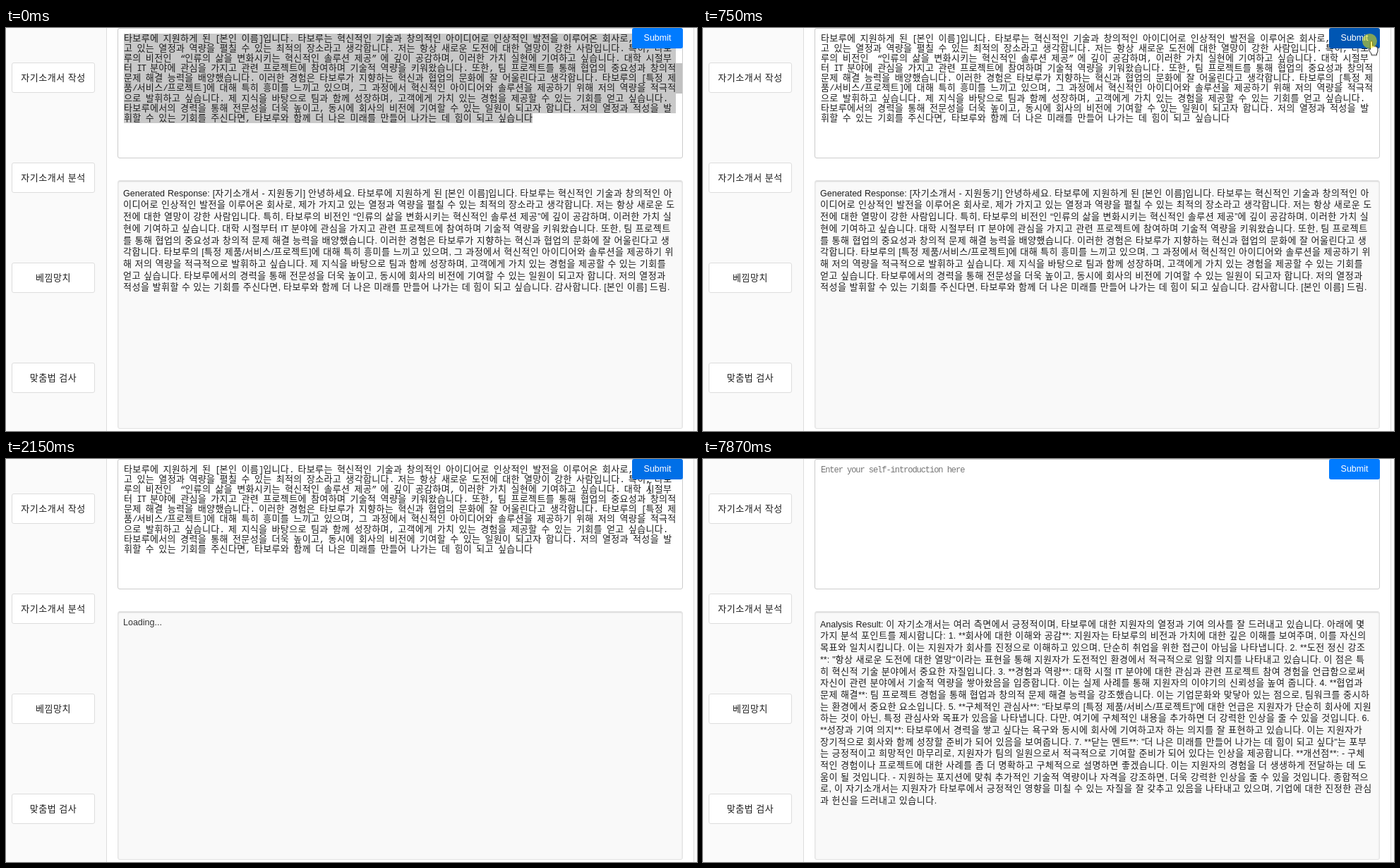
Recreate the animation shown at these times as an HTML page. Size 979 px wide and 572 px high, loop 9.4 s.

```html
<!DOCTYPE html>
<html lang="ko">
<head>
<meta charset="utf-8">
<title>자기소개서 분석</title>
<style>
html, body { margin: 0; width: 100%; height: 100%; overflow: hidden; }
body { position: relative; background: #fafafa; color: #1c1c1c;
  font: 12.5px/16.68px "Liberation Sans", Arial, sans-serif; }
body * { box-sizing: border-box; }
body > *, .cursor path { position: absolute; }
b { font: 13px/0 "Noto Sans CJK KR", "Noto Sans CJK", sans-serif; letter-spacing: .54px; }

.main { left: 142px; top: -5px; width: 833px; height: 590px; background: #fff;
  border: 1px solid #ddd; }
.tab { left: 8px; width: 118px; height: 43px; line-height: 42px; text-align: center;
  background: #fff; border: 1px solid #ddd; border-radius: 3px; word-spacing: .45px; }
.field { left: 158px; top: 0; width: 801px; height: 185px; background: #fff;
  border: 1px solid #ccc; border-radius: 3px; }
.panel { left: 158px; top: 216px; width: 801px; height: 353px; background: #f9f9f9;
  border: 1px solid #e4e4e4; border-radius: 3px;
  box-shadow: inset 0 1px 2px rgba(0,0,0,.16); }

pre { margin: 0; white-space: pre; }
.out { left: 166px; top: 226.8px; font: inherit; word-spacing: .46px; }
.in { left: 167px; top: 9px; font: 12px/14.1px "Liberation Mono", monospace; letter-spacing: -1.04px; }
.in b { letter-spacing: .36px; }
.hint { color: #757575; }
.wait { top: 224.3px; color: #333; }
.sel { left: 167px; top: 8px; width: 782px; height: 113px; background: #c8c8c8; }
.sel.last { top: 121px; width: 579px; height: 14px; }
.thumb { left: 949px; top: 50px; width: 9px; height: 43px; background: #c1c1c1; }

.submit { left: 887px; top: 0; width: 72px; height: 29px; border-radius: 3px; color: #fff;
  line-height: 29px; text-align: center; animation: hover 9.4s ease infinite; }
.ring { left: 934px; top: 8px; width: 21px; height: 21px; border-radius: 50%;
  background: rgba(255,240,0,.5); animation: ring 9.4s step-end infinite; }
.cursor { left: 0; top: 0; width: 1px; height: 1px; overflow: visible;
  animation: move 9.4s linear infinite; }
.arrow { animation: arrow 9.4s step-end infinite; }
.hand { animation: hand 9.4s step-end infinite; }
.beam { animation: beam 9.4s step-end infinite; }

.sel, .thumb { animation: selected 9.4s step-end infinite; }
.first { animation: first 9.4s step-end infinite; }
.wait { animation: wait 9.4s step-end infinite; }
.typed { animation: typed 9.4s step-end infinite; }
.done { animation: done 9.4s step-end infinite; }

@keyframes selected { 0% { visibility: visible } 7.979%, 100% { visibility: hidden } }
@keyframes first { 0% { visibility: visible } 8.723%, 100% { visibility: hidden } }
@keyframes wait { 0% { visibility: hidden } 8.723% { visibility: visible } 83.723%, 100% { visibility: hidden } }
@keyframes typed { 0% { visibility: visible } 83.723%, 100% { visibility: hidden } }
@keyframes done { 0% { visibility: hidden } 83.723%, 100% { visibility: visible } }
@keyframes ring { 0% { visibility: hidden } 7.979% { visibility: visible } 8.723%, 100% { visibility: hidden } }
@keyframes arrow {
  0% { visibility: hidden } .745% { visibility: visible } 3.617% { visibility: hidden }
  34.29% { visibility: visible } 42.66%, 100% { visibility: hidden }
}
@keyframes hand { 0% { visibility: hidden } 3.617% { visibility: visible } 21.38%, 100% { visibility: hidden } }
@keyframes beam { 0% { visibility: hidden } 21.38% { visibility: visible } 34.29%, 100% { visibility: hidden } }
@keyframes hover {
  0%, 3.617% { background: #007bff }
  6.809%, 21.6% { background: #0056b3 }
  24.79%, 100% { background: #007bff }
}
@keyframes move {
  0%, .745% { transform: translate(970px, 558px) }
  3.617% { transform: translate(954px, 25px) }
  6.5% { transform: translate(947px, 18.5px) }
  12.86% { transform: translate(947px, 18.5px) }
  12.87%, 14.99% { transform: translate(942px, 18.5px) }
  15% { transform: translate(942px, 22px) }
  15.74%, 20.64% { transform: translate(941.5px, 26.5px) }
  21.38% { transform: translate(930px, 34px) }
  22.87% { transform: translate(912px, 41px) }
  25.21% { transform: translate(912px, 43px) }
  28.08% { transform: translate(912px, 43px); animation-timing-function: ease-in-out }
  38.08% { transform: translate(862px, 244px); animation-timing-function: ease-in }
  42.3%, 100% { transform: translate(922px, 565px) }
}
</style>
</head>
<body>
<div class="main"></div>
<div class="tab" style="top:49px">자기소개서 작성</div>
<div class="tab" style="top:191px">자기소개서 분석</div>
<div class="tab" style="top:333px">베낌망치</div>
<div class="tab" style="top:475px">맞춤법 검사</div>

<div class="field"></div>
<div class="sel"></div>
<div class="sel last"></div>
<div class="thumb"></div>
<pre class="in typed">
타보루에 지원하게 된 [본인 이름]입니다. 타보루는 혁신적인 기술과 창의적인 아이디어로 인상적인 발전을 이루어온 회사로, 제가 가지
고 있는 열정과 역량을 펼칠 수 있는 최적의 장소라고 생각합니다. 저는 항상 새로운 도전에 대한 열망이 강한 사람입니다. 특히, 타보
루의 비전인  “인류의 삶을 변화시키는 혁신적인 솔루션 제공” 에 깊이 공감하며, 이러한 가치 실현에 기여하고 싶습니다. 대학 시절부
터 IT 분야에 관심을 가지고 관련 프로젝트에 참여하며 기술적 역량을 키워왔습니다. 또한, 팀 프로젝트를 통해 협업의 중요성과 창의적
문제 해결 능력을 배양했습니다. 이러한 경험은 타보루가 지향하는 혁신과 협업의 문화에 잘 어울린다고 생각합니다. 타보루의 [특정 제
품/서비스/프로젝트]에 대해 특히 흥미를 느끼고 있으며, 그 과정에서 혁신적인 아이디어와 솔루션을 제공하기 위해 저의 역량을 적극적
으로 발휘하고 싶습니다. 제 지식을 바탕으로 팀과 함께 성장하며, 고객에게 가치 있는 경험을 제공할 수 있는 기회를 얻고 싶습니다.
타보루에서의 경력을 통해 전문성을 더욱 높이고, 동시에 회사의 비전에 기여할 수 있는 일원이 되고자 합니다. 저의 열정과 적성을 발
휘할 수 있는 기회를 주신다면, 타보루와 함께 더 나은 미래를 만들어 나가는 데 힘이 되고 싶습니다</pre>
<pre class="in hint done">Enter your self-introduction here</pre>

<div class="panel"></div>
<pre class="out first">
Generated Response: [자기소개서 - 지원동기] 안녕하세요. 타보루에 지원하게 된 [본인 이름]입니다. 타보루는 혁신적인 기술과 창의적인 아
이디어로 인상적인 발전을 이루어온 회사로, 제가 가지고 있는 열정과 역량을 펼칠 수 있는 최적의 장소라고 생각합니다. 저는 항상 새로운 도
전에 대한 열망이 강한 사람입니다. 특히, 타보루의 비전인 “인류의 삶을 변화시키는 혁신적인 솔루션 제공”에 깊이 공감하며, 이러한 가치 실
현에 기여하고 싶습니다. 대학 시절부터 IT 분야에 관심을 가지고 관련 프로젝트에 참여하며 기술적 역량을 키워왔습니다. 또한, 팀 프로젝트
를 통해 협업의 중요성과 창의적 문제 해결 능력을 배양했습니다. 이러한 경험은 타보루가 지향하는 혁신과 협업의 문화에 잘 어울린다고 생
각합니다. 타보루의 [특정 제품/서비스/프로젝트]에 대해 특히 흥미를 느끼고 있으며, 그 과정에서 혁신적인 아이디어와 솔루션을 제공하기 위
해 저의 역량을 적극적으로 발휘하고 싶습니다. 제 지식을 바탕으로 팀과 함께 성장하며, 고객에게 가치 있는 경험을 제공할 수 있는 기회를
얻고 싶습니다. 타보루에서의 경력을 통해 전문성을 더욱 높이고, 동시에 회사의 비전에 기여할 수 있는 일원이 되고자 합니다. 저의 열정과
적성을 발휘할 수 있는 기회를 주신다면, 타보루와 함께 더 나은 미래를 만들어 나가는 데 힘이 되고 싶습니다. 감사합니다. [본인 이름] 드림.</pre>
<pre class="out wait">Loading...</pre>
<pre class="out done">
Analysis Result: 이 자기소개서는 여러 측면에서 긍정적이며, 타보루에 대한 지원자의 열정과 기여 의사를 잘 드러내고 있습니다. 아래에 몇
가지 분석 포인트를 제시합니다: 1. **회사에 대한 이해와 공감**: 지원자는 타보루의 비전과 가치에 대한 깊은 이해를 보여주며, 이를 자신의
목표와 일치시킵니다. 이는 지원자가 회사를 진정으로 이해하고 있으며, 단순히 취업을 위한 접근이 아님을 나타냅니다. 2. **도전 정신 강조
**: "항상 새로운 도전에 대한 열망"이라는 표현을 통해 지원자가 도전적인 환경에서 적극적으로 임할 의지를 나타내고 있습니다. 이 점은 특
히 혁신적 기술 분야에서 중요한 자질입니다. 3. **경험과 역량**: 대학 시절 IT 분야에 대한 관심과 관련 프로젝트 참여 경험을 언급함으로써
자신이 관련 분야에서 기술적 역량을 쌓아왔음을 입증합니다. 이는 실제 사례를 통해 지원자의 이야기의 신뢰성을 높여 줍니다. 4. **협업과
문제 해결**: 팀 프로젝트 경험을 통해 협업과 창의적 문제 해결 능력을 강조했습니다. 이는 기업문화와 맞닿아 있는 점으로, 팀워크를 중시하
는 환경에서 중요한 요소입니다. 5. **구체적인 관심사**: "타보루의 [특정 제품/서비스/프로젝트]"에 대한 언급은 지원자가 단순히 회사에 지원
하는 것이 아닌, 특정 관심사와 목표가 있음을 나타냅니다. 다만, 여기에 구체적인 내용을 추가하면 더 강력한 인상을 줄 수 있을 것입니다. 6.
**성장과 기여 의지**: 타보루에서 경력을 쌓고 싶다는 욕구와 동시에 회사에 기여하고자 하는 의지를 잘 표현하고 있습니다. 이는 지원자가
장기적으로 회사와 함께 성장할 준비가 되어 있음을 보여줍니다. 7. **닫는 멘트**: "더 나은 미래를 만들어 나가는 데 힘이 되고 싶다"는 포부
는 긍정적이고 희망적인 마무리로, 지원자가 팀의 일원으로서 적극적으로 기여할 준비가 되어 있다는 인상을 제공합니다. **개선점**: - 구체
적인 경험이나 프로젝트에 대한 사례를 좀 더 명확하고 구체적으로 설명하면 좋겠습니다. 이는 지원자의 경험을 더 생생하게 전달하는 데 도
움이 될 것입니다. - 지원하는 포지션에 맞춰 추가적인 기술적 역량이나 자격을 강조하면, 더욱 강력한 인상을 줄 수 있을 것입니다. 종합적으
로, 이 자기소개서는 지원자가 타보루에서 긍정적인 영향을 미칠 수 있는 자질을 잘 갖추고 있음을 나타내고 있으며, 기업에 대한 진정한 관심
과 헌신을 드러내고 있습니다.</pre>

<div class="submit">Submit</div>
<svg class="cursor">
  <path class="arrow" d="M0 0V13l3-2.8 2 4.6 2-.9-2-4.4h4z" fill="#fff" stroke="#000" stroke-width=".8"/>
  <path class="hand" d="M-1.5 12V1.5a1.5 1.5 0 0 1 3 0V7q1.6-1 2.8.6 1.6-.9 2.7.7 2-.6 2 1.7V14q0 2-1.5 4V20H0V18q-2-2-4-6.5 0-2 2.5.5z" fill="#fff" stroke="#000" stroke-width=".9"/>
  <path class="beam" d="M-2.5-8Q0-8 0-6.5V6.5Q0 8-2.5 8M2.5-8Q0-8 0-6.5M0 6.5Q0 8 2.5 8" fill="none" stroke="#000" stroke-width=".9"/>
</svg>
<div class="ring"></div>
<script>
// Hangul runs get their own font size and spacing
for (const el of document.querySelectorAll("pre, .tab"))
  el.innerHTML = el.innerHTML.replace(/[가-힣]+/g, "<b>$&</b>");
</script>
</body>
</html>
```
